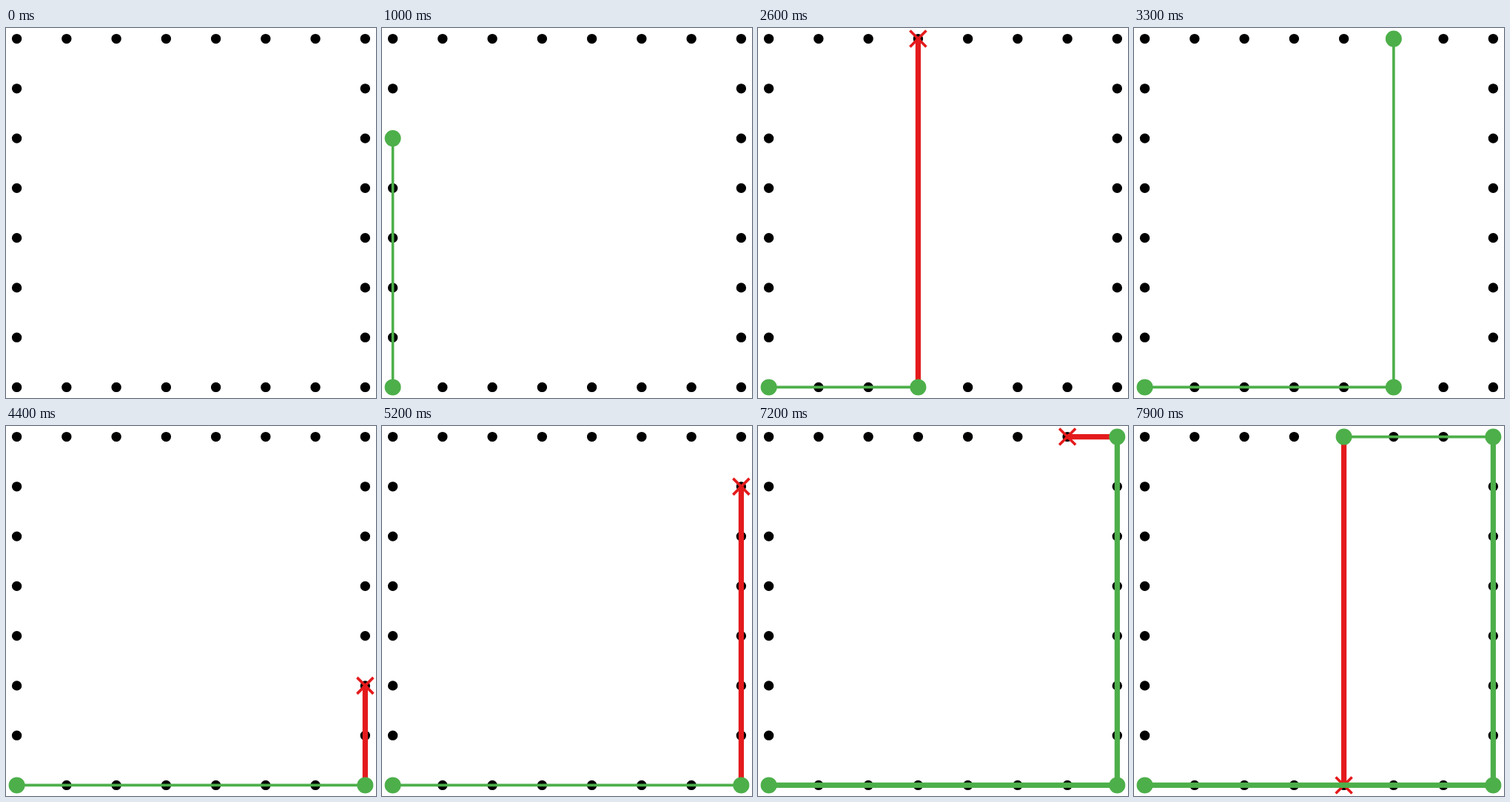
Recreate the animation shown at these times as an HTML page. Size 500 px wide and 500 px high, loop 8000 ms.

```html
<!DOCTYPE html>
<html lang="en">
<head>
<meta charset="utf-8">
<title>Monotone chain hull</title>
<style>
  html, body { margin: 0; width: 100%; height: 100%; overflow: hidden; background: #fff; }
  svg { display: block; width: 100%; height: 100%; }
  path { fill: none; stroke-width: 3.6; }
  .thick { stroke-width: 7.2; }
  .red { stroke: #e41a1c; }
  .green { stroke: #4daf4a; }
  .dots { stroke: #000; stroke-width: 13.4; stroke-linecap: round; }
  .nodes { stroke: #4daf4a; stroke-width: 22; stroke-linecap: round; }
</style>
</head>
<body>
<svg viewBox="0 0 500 500">
  <path id="dots" class="dots"/>
  <path id="dropped" class="red thick"/>
  <path id="cross" class="red"/>
  <path id="chain" class="green"/>
  <path id="hull" class="green thick"/>
  <path id="nodes" class="nodes"/>
</svg>
<script>
const STEP = 100, COUNT = 80, LAST = 7, ARM = 11;
const layers = ['dropped', 'cross', 'chain', 'hull', 'nodes'];
const el = id => document.getElementById(id);

const coord = i => 14.6 + i * 470.8 / LAST;
const place = ([x, y]) => [coord(x), coord(LAST - y)];
const line = pts => pts.length > 1 ? 'M' + pts.map(p => place(p).join(' ')).join('L') : '';
const spots = pts => pts.map(p => `M${place(p).join(' ')}h0.001`).join('');
const mark = p => {
  const [x, y] = place(p), d = 2 * ARM;
  return `M${x - ARM} ${y - ARM}l${d} ${d}M${x - ARM} ${y + ARM}l${d} ${-d}`;
};

// Grid points on the square's border, sorted by x, then upwards.
const points = [];
for (let x = 0; x <= LAST; x++)
  for (let y = 0; y <= LAST; y++)
    if (x % LAST === 0 || y % LAST === 0) points.push([x, y]);

const turn = (a, b, c) =>
  (b[0] - a[0]) * (c[1] - a[1]) - (b[1] - a[1]) * (c[0] - a[0]);

// Every push, pop and finished half of the scan is one step.
const steps = [];
let hull = [];

function record(stack, popped) {
  steps.push({
    dropped: popped ? line([stack[stack.length - 1], popped]) : '',
    cross: popped ? mark(popped) : '',
    chain: line(stack),
    hull: line(hull),
    nodes: spots([...hull, ...stack])
  });
}

function scan(order, stack) {
  for (const p of order) {
    while (stack.length > 1 && turn(...stack.slice(-2), p) <= 0) {
      const popped = stack.pop();
      record(stack, popped);
    }
    stack.push(p);
    record(stack);
  }
  return stack;
}

record([]);
hull = scan(points, []);
const back = [...points].reverse();
record([back[0]]);
scan(back.slice(1), [back[0]]);

el('dots').setAttribute('d', spots(points));

let shown = -1;
const start = performance.now();
function draw() {
  const now = Math.floor((performance.now() - start) / STEP) % COUNT;
  if (now !== shown) {
    shown = now;
    for (const id of layers) el(id).setAttribute('d', steps[now][id]);
  }
  requestAnimationFrame(draw);
}
draw();
</script>
</body>
</html>
```
